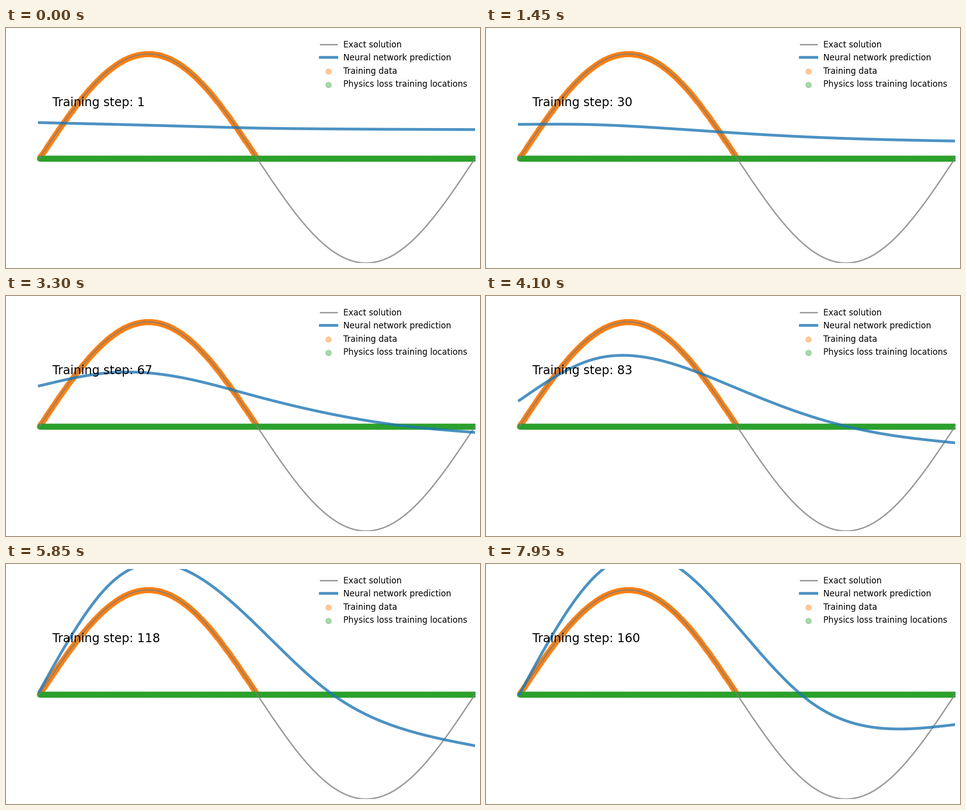
Write a matplotlib script that moves like this. It is 950 px wide and 482 px high and loops after 8 s.

```python
import numpy as np
import matplotlib.pyplot as plt
from matplotlib.animation import FuncAnimation

W, H, DPI = 950, 482, 100
FRAMES, INTERVAL = 160, 50
ZERO_Y, UNIT_Y = 262, 210   # pixel row of y = 0 and pixels per unit

# Pixel rows of the prediction at evenly spaced x, for a few training steps.
POSES = {
    1: (190, 193.4, 197.3, 201, 202.7, 203.5, 204),
    30: (193.5, 194, 201.3, 211, 219, 224, 227),
    67: (180.5, 153.7, 165, 202, 236.5, 260.5, 274),
    98: (239.5, 96, 88.5, 163.5, 246, 295.5, 319),
    118: (256, 36.5, 11.5, 124, 258, 331, 365),
    134: (243, 22, -15, 113, 258, 328.5, 347),
    160: (262, 31, -9, 125, 276, 330, 322.5),
}


def hermite(keys, values, slopes, at):
    """Cubic interpolation from values and slopes at the keys."""
    i = np.clip(np.searchsorted(keys, at, side="right") - 1, 0, len(keys) - 2)
    h = keys[i + 1] - keys[i]
    t = (at - keys[i]) / h
    ease = t * t * (3 - 2 * t)
    return ((1 - ease) * values[i] + ease * values[i + 1]
            + h * t * (1 - t) * ((1 - t) * slopes[i] - t * slopes[i + 1]))


def natural_slopes(values, h):
    """Slopes of the natural cubic spline through evenly spaced values."""
    n = len(values)
    system = 4 * np.eye(n) + np.eye(n, k=1) + np.eye(n, k=-1)
    system[0, 0] = system[-1, -1] = 2
    padded = np.pad(values, 1, mode="edge")
    return np.linalg.solve(system, 3 * (padded[2:] - padded[:-2]) / h)


def spline(values, x):
    nodes = np.linspace(0, 1, len(values))
    return hermite(nodes, values, natural_slopes(values, nodes[1]), x)


def exact(x):
    return np.sin(2 * np.pi * x)


def scattered(n, end):
    """Random positions that cover 0 to end without large gaps."""
    return end * (np.arange(n) + rng.random(n)) / n


rng = np.random.default_rng(4)
x = np.linspace(0, 1, 500)
steps = np.array(list(POSES))
curves = np.array([spline((ZERO_Y - np.array(rows)) / UNIT_Y, x)
                   for rows in POSES.values()])
slopes = np.gradient(curves, steps, axis=0)
slopes[0] *= 2.2   # training starts fast

plt.rcParams["font.family"] = "DejaVu Sans"
fig = plt.figure(figsize=(W / DPI, H / DPI), dpi=DPI, facecolor="white")
ax = fig.add_axes([10 / W, 10 / H, 930 / W, 462 / H])
ax.set_xlim(-0.065, 1)
ax.set_ylim(-1, 1.2)
ax.axis("off")

ax.plot(x, exact(x), color="grey", lw=2, alpha=0.8, label="Exact solution")
line, = ax.plot(x, curves[0], color="tab:blue", lw=4, alpha=0.8,
                label="Neural network prediction")
x_data, x_phys = scattered(500, 0.5), scattered(1000, 1)
ax.scatter(x_data, exact(x_data), s=60, color="tab:orange", alpha=0.4,
           label="Training data")
ax.scatter(x_phys, np.zeros_like(x_phys), s=60, color="tab:green", alpha=0.4,
           label="Physics loss training locations")
ax.legend(loc="upper right", frameon=False, fontsize="large")
label = ax.text(0.03, 0.5, "", fontsize="xx-large", color="black")


def update(frame):
    step = frame + 1
    line.set_ydata(hermite(steps, curves, slopes, step))
    label.set_text(f"Training step: {step}")
    return line, label


anim = FuncAnimation(fig, update, frames=FRAMES, interval=INTERVAL,
                     init_func=lambda: update(0), repeat=True, repeat_delay=0)
plt.show()
```
